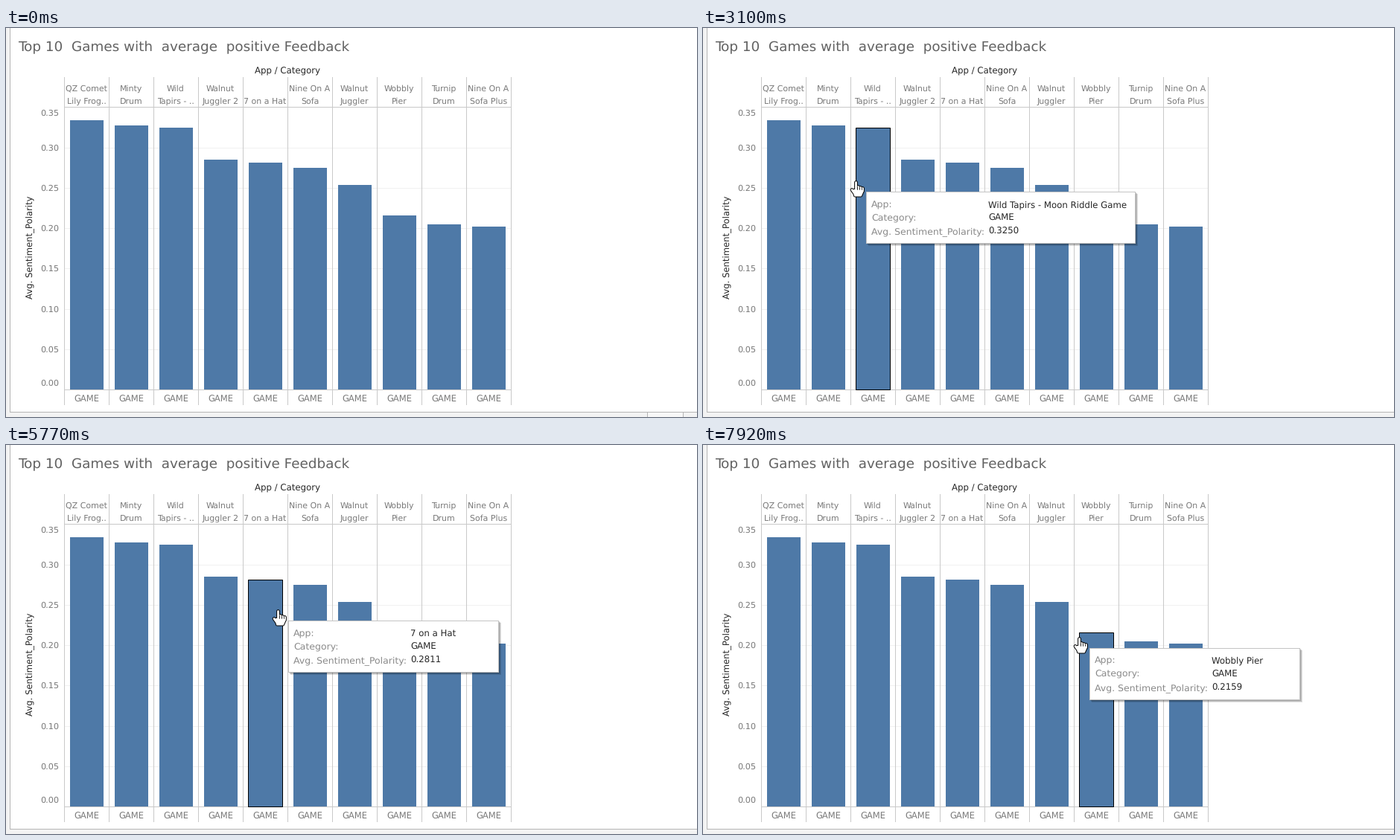
Write a matplotlib script that moves like this. It is 928 px wide and 523 px high and loops after 7.99 s.

```python
import numpy as np
import matplotlib.pyplot as plt
from matplotlib.animation import FuncAnimation
from matplotlib.patches import Polygon, Rectangle
from matplotlib.transforms import Affine2D

W, H, DPI = 928, 523, 64
PT = 72 / DPI  # points per pixel
STEP, LOOP = 34, 7990

BLUE, GRID, RULE, EDGE = "#4e79a7", "#f1f1f1", "#c9c9c9", "#b5b5b5"
SOFT, DARK = "#7a7a7a", "#262626"
LEFT, COL, BASE, SCALE = 78, 60, 486, 1084
TIP_H, ROW, VALUE_X = 70, 18, 164

# a line break marks where the column header wraps
APPS = {
    "QZ Comet\nLily Frogs™": 0.3340,
    "Minty\nDrum": 0.3275,
    "Wild\nTapirs - Moon Riddle Game": 0.3250,
    "Walnut\nJuggler 2": 0.2848,
    "7 on a Hat": 0.2811,
    "Nine On A\nSofa": 0.2749,
    "Walnut\nJuggler": 0.2537,
    "Wobbly\nPier": 0.2159,
    "Turnip\nDrum": 0.2048,
    "Nine On A\nSofa Plus": 0.2020,
}
NAMES = [key.replace("\n", " ") for key in APPS]
VALUES = list(APPS.values())
TOPS = [BASE - round(SCALE * v) for v in VALUES]

# pointer key points: time, x, y
TIMES, XS, YS = zip(
    (590, 890, 523), (1050, 720, 30), (1850, 16, 107), (2150, 118, 204),
    (2360, 118, 204), (2660, 185, 204), (3870, 238, 204), (4870, 299, 206),
    (5770, 366, 220), (7220, 442, 245), (7920, 506, 257))

plt.rcParams.update({"font.family": "DejaVu Sans", "text.hinting": "none"})
fig = plt.figure(figsize=(W / DPI, H / DPI), dpi=DPI, facecolor="white")
ax = fig.add_axes([0, 0, 1, 1])
ax.set(xlim=(0, W), ylim=(H, 0))
ax.axis("off")

tip_move, cursor_move = Affine2D(), Affine2D()
TIP, CURSOR = tip_move + ax.transData, cursor_move + ax.transData


def box(x, y, w, h, color, z=1, **kw):
    return ax.add_patch(Rectangle((x, y), w, h, fc=color, lw=0, zorder=z, **kw))


def text(x, y, s, size, color=SOFT, z=3, **kw):
    return ax.text(x, y, s, fontsize=size * PT, color=color, zorder=z, **kw)


def shape(points, fill, edge, width, z=20):
    return ax.add_patch(Polygon(points, fc=fill, ec=edge, lw=width * PT, zorder=z,
                                joinstyle="round", transform=CURSOR))


def stroke(xs, ys, color, width, z=20):
    return ax.plot(xs, ys, color=color, lw=width * PT, zorder=z,
                   solid_capstyle="round", transform=CURSOR)[0]


def draw_sheet():
    box(0, 0, 5, H, "#f3f3f3")
    box(0, 517, W, 6, "#f3f3f3")
    box(5, 0, 1, 517, EDGE)
    box(5, 516, W, 1, EDGE)
    text(16, 31, "Top 10  Games with  average  positive Feedback", 18.4, "#626262")
    text(378, 61, "App / Category", 11.7, DARK, ha="center")
    text(32, 295, "Avg. Sentiment_Polarity", 11.6, DARK,
         rotation=90, ha="center", va="center")


def draw_chart():
    for k in range(8):
        y = BASE - 54.17 * k
        if 0 < k < 7:
            box(LEFT, round(y), 10 * COL, 1, GRID)
        text(71, round(np.clip(y, 114, 477)) + 4, f"{k * 0.05:.2f}", 11.3, ha="right")
    for i, (key, top) in enumerate(zip(APPS, TOPS)):
        x = LEFT + COL * i
        box(x + 8, top, 45, BASE - top, BLUE, 2)
        for k, line in enumerate(reversed(key.split("\n"))):
            short = line if len(line) <= 10 else line[:9] + ".."
            text(x + 30, 102 - 17 * k, short, 11, ha="center")
        text(x + 30, 503, "GAME", 11.5, ha="center")
    for i in range(11):
        box(LEFT + COL * i, 66, 1, 441, RULE)
    for y in (106, BASE):
        box(LEFT, y, 10 * COL + 1, 1, RULE)


def make_hand():
    """Round-capped fingers over a palm: a black pass, then a white one."""
    parts = []
    palm = [(-2.5, 14), (9, 13), (9, 17), (7, 21.5), (-1, 21.5)]
    for color, grow in (("black", 2), ("white", 0)):
        parts.append(shape(palm, color, color, 2 + grow))
        parts.append(stroke([-5, -1], [13.5, 19], color, 2.8 + grow))
        for k in range(4):
            top = 7.5 + k if k else 2.5
            parts.append(stroke([3 * k, 3 * k], [top, 15], color, 2.8 + grow))
    for k in range(3):
        x = 1.5 + 3 * k
        parts.append(stroke([x, x], [9 + k, 13], "black", 0.8, 21))
    return parts


draw_sheet()
draw_chart()

tab = [box(861, 516, 49, 7, EDGE, 4), box(862, 517, 47, 6, "#f8f8f8", 5)]
outline = ax.add_patch(Rectangle((0, 0), 46, 1, fill=False, ec="black",
                                 lw=PT, zorder=4))
hand = make_hand()
arrow = [shape([(0, 0), (0, 17), (4, 13.5), (6.5, 19), (9, 18), (6.5, 12.5),
                (11.5, 12.5)], "white", "black", 1.1)]

# tooltip, drawn at the origin and moved as one
shadows = [box(d, d, 1, TIP_H, "black", 10, alpha=0.13, transform=TIP)
           for d in (1, 2, 3)]
frame = box(0, 0, 1, TIP_H, "#c4c4c4", 11, transform=TIP)
panel = box(1, 1, 1, TIP_H - 2, "white", 12, transform=TIP)
labels = [text(7, 21 + ROW * k, s, 12.45, "#8a8a8a", 13, transform=TIP)
          for k, s in enumerate(("App:", "Category:", "Avg. Sentiment_Polarity:"))]
values = [text(VALUE_X, 21 + ROW * k, "GAME", 11.8, DARK, 13, transform=TIP)
          for k in range(3)]
tooltip = [*shadows, frame, panel, *labels, *values, outline]


def tip_width(name):
    values[0].set_text(name)
    span = values[0].get_window_extent(fig.canvas.get_renderer()).width
    return max(283, round(VALUE_X + span + 12))


WIDTHS = [tip_width(name) for name in NAMES]


def show(artists, on):
    for a in artists:
        a.set_visible(on)


def hovered(x, y):
    i = int((x - LEFT) // COL)
    if x >= LEFT + 7 and i < len(TOPS) and y >= TOPS[i]:
        return i
    return None


def place_tooltip(i, x, y):
    for s in (*shadows, frame):
        s.set_width(WIDTHS[i])
    panel.set_width(WIDTHS[i] - 2)
    values[0].set_text(NAMES[i])
    values[2].set_text(f"{VALUES[i]:.4f}")
    tip_move.clear().translate(x + 14, y + 16)
    outline.set_xy((LEFT + COL * i + 7, TOPS[i]))
    outline.set_height(BASE - TOPS[i])


def update(n):
    t = (n + 0.5) * STEP
    x, y = (round(float(np.interp(t, TIMES, path))) for path in (XS, YS))
    active = t >= TIMES[0]
    i = hovered(x, y) if active else None
    show(tab, t < 60)
    show(arrow, active and i is None)
    show(hand, i is not None)
    show(tooltip, i is not None)
    cursor_move.clear().translate(x, y)
    if i is not None:
        place_tooltip(i, x, y)
    return [*tab, *arrow, *hand, *tooltip]


anim = FuncAnimation(fig, update, frames=LOOP // STEP, interval=STEP,
                     repeat=True, repeat_delay=0)
plt.show()
```
